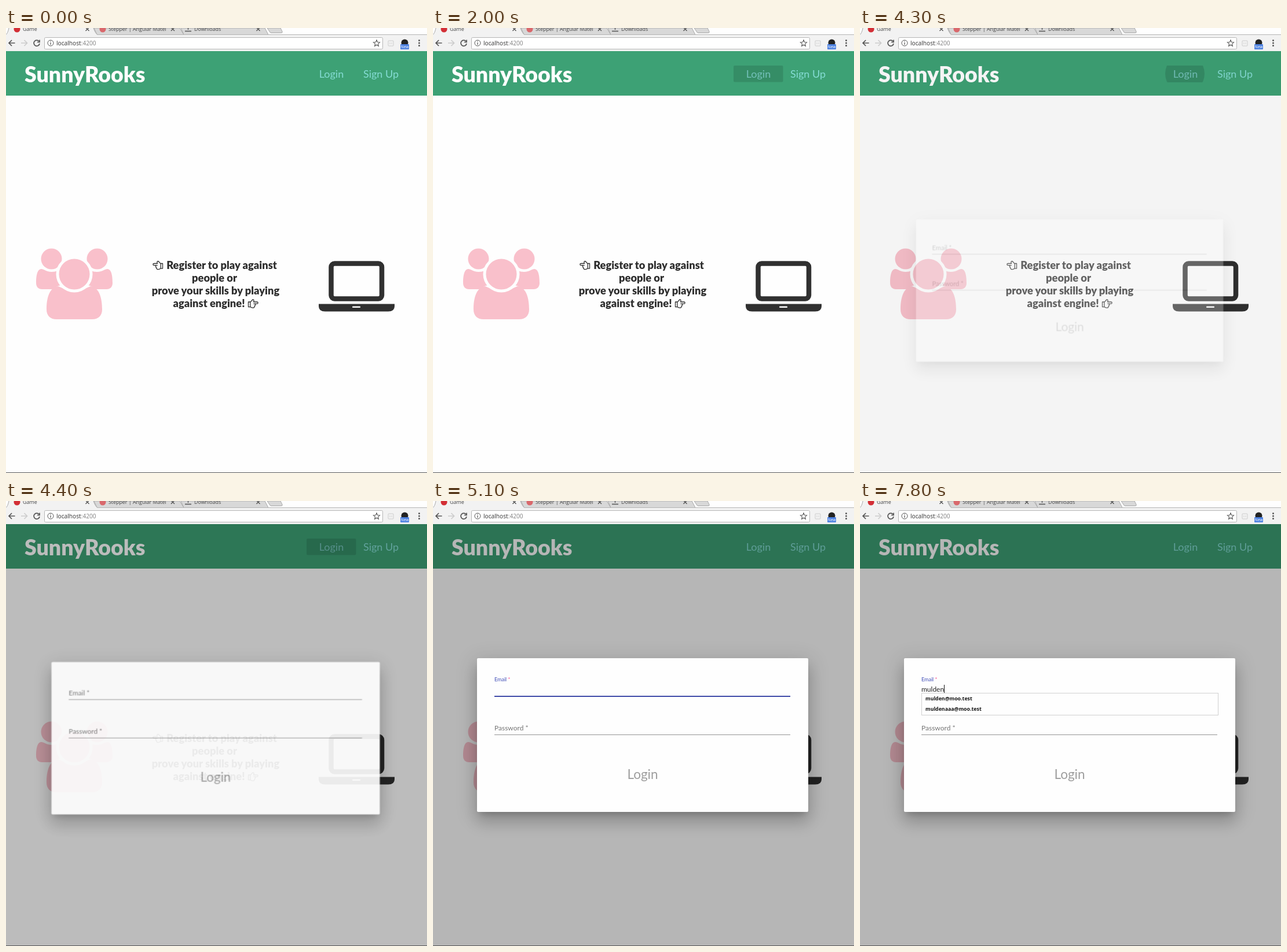
Animation, 727 px wide and 770 px high, one loop 8 s. Source, as an HTML page:

```html
<!DOCTYPE html>
<html lang="en">
<head>
<meta charset="utf-8">
<title>Login dialog</title>
<style>
  html, body { margin: 0; width: 100%; height: 100%; overflow: hidden; background: #fefefe; }
  #stage { position: relative; width: 727px; height: 770px; overflow: hidden; font-family: Lato, sans-serif; }
  #stage > * { position: absolute; }
  svg { display: block; }
  .ui { font-family: "Open Sans", "Noto Sans", sans-serif; }
  .tab { font-size: 8.9px; fill: #444; }
  .mid { text-anchor: middle; }
  .pitch { font-size: 18.3px; font-weight: 900; fill: #2e2e2e; }
  .nav { font-size: 18px; fill: #85dcd4; }
  .line { fill: none; stroke: #555; stroke-width: 1.4; }

  .anim { animation: 8s step-end infinite; }
  #signHover { animation-name: signHover; }
  #loginHover { animation-name: loginHover; }
  #ripple { animation-name: ripple; }
  #shade { left: 0; top: 40px; width: 727px; height: 729px; background: #000; animation-name: shade; }
  #dialog {
    left: 76px; top: 272px; width: 572px; height: 266px;
    background: #fefefe; border-radius: 2px; animation-name: dialog;
    box-shadow: 0 8px 11px -5px rgba(0,0,0,.2), 0 18px 28px 2px rgba(0,0,0,.14), 0 7px 34px 6px rgba(0,0,0,.12);
  }
  .field { font-size: 12px; fill: rgba(0,0,0,.54); }
  #label { animation-name: label; }
  #star { animation-name: star; }
  #focus { transform-box: fill-box; transform-origin: center; fill: #3f4aa8; animation-name: focus; }
  #entry { left: 106px; top: 317px; height: 16px; font-size: 12px; line-height: 17px; color: #222; white-space: pre; }
  #caret { position: absolute; left: 100%; top: 1px; width: 1px; height: 14px; background: #111; animation-name: caret; }
  #list {
    left: 106px; top: 332px; width: 513px; box-sizing: border-box;
    border: 1px solid #d0d0d0; background: #fefefe; color: #111; font-size: 8.8px; font-weight: 700;
  }
  #list div { height: 18.33px; line-height: 18.33px; padding-left: 6px; }
  #floor { left: 0; top: 769px; width: 727px; height: 1px; background: #555; }

  @keyframes signHover { 0%, 2.5% { opacity: 0 } 1.25% { opacity: .12 } }
  @keyframes loginHover { 0%, 51.25% { opacity: 0 } 25% { opacity: .12 } }
  @keyframes ripple {
    0% { r: 0; opacity: 0 }
    51.25% { r: 12px; opacity: .12 }
    52.5% { r: 24px; opacity: .12 }
    53.75% { r: 34px; opacity: .12 }
    55% { r: 46px; opacity: .12 }
    56.25% { r: 46px; opacity: .1 }
    57.5% { r: 46px; opacity: .06 }
    58.75% { r: 46px; opacity: .03 }
    60%, 100% { r: 46px; opacity: 0 }
  }
  @keyframes shade {
    0% { opacity: 0 }
    53.75% { opacity: .039 }
    55% { opacity: .264 }
    56.25% { opacity: .284 }
    57.5%, 100% { opacity: .288 }
  }
  @keyframes dialog {
    0% { opacity: 0; transform: translateY(66px) scale(.9) }
    53.75% { opacity: .27; transform: translateY(49px) scale(.928) }
    55% { opacity: .915; transform: translateY(5.5px) scale(.9913) }
    56.25% { opacity: .985; transform: translateY(1px) scale(.9985) }
    57.5%, 100% { opacity: 1; transform: none }
  }
  @keyframes label {
    0% { transform: translate(106px, 330px) scale(1); fill: rgba(0,0,0,.54) }
    57.5% { transform: translate(106px, 324.5px) scale(.925); fill: #6870a0 }
    58.75% { transform: translate(106px, 315px) scale(.8); fill: #4a58b0 }
    60% { transform: translate(106px, 312px) scale(.76); fill: #4350b8 }
    61.25%, 100% { transform: translate(106px, 311.5px) scale(.75); fill: #4350b8 }
  }
  @keyframes star { 0% { fill: rgba(0,0,0,.54) } 57.5%, 100% { fill: #ff4081 } }
  @keyframes focus {
    0% { opacity: 0; transform: scaleX(.5) }
    57.5% { opacity: .5; transform: scaleX(.7) }
    58.75% { opacity: 1; transform: scaleX(.93) }
    60%, 100% { opacity: 1; transform: none }
  }
  @keyframes caret {
    0%, 63.75%, 76.25% { opacity: 0 }
    62.5%, 70%, 82.5%, 100% { opacity: 1 }
  }
</style>
</head>
<body>
<div id="stage">
  <svg width="727" height="770" viewBox="0 0 727 770">
    <defs>
      <clipPath id="loginBox"><rect x="519" y="65" width="85.500" height="28.500" rx="2"/></clipPath>
      <clipPath id="tabClip"><rect x="170" width="106" height="12"/></clipPath>
      <path id="close" d="M-3-1L3 5M3-1L-3 5" class="line"/>
      <path id="shoulder" d="M61 417c4 0 9 5 18 5 4 0 7-1 10-2-1 13 3 19 8 25-6 0-11 3-14 7H62c-6 0-10-4-10-11 0-9 1-24 9-24z"/>
      <path id="hand" fill="none" stroke="#2e2e2e" stroke-width="1.300" stroke-linejoin="round"
        d="M1 5H4.500C6.500 4.500 7 1 9 1c1.800 0 2 1.800 1 4H16a1.600 1.600 0 0 1 0 3.200H12.500c1 .6.800 2.300-.3 2.600.6 1 0 2.300-1 2.400.2 1.300-.6 2-2 2H8C6 15.200 5.500 13.600 4 13.600H1ZM12.500 8.200H9.800M4.300 5V13.600"/>
    </defs>

    <!-- browser bar -->
    <rect width="727" height="12" fill="#fefefe"/>
    <rect y="11" width="727" height="29" fill="#f2f2f2"/>
    <g fill="#d8d8d8" stroke="#a8a8a8">
      <path d="M451 0l4 6q1 2.500 3 2.500h17q3 0 2-2.500l-3-6z"/>
      <path d="M302 0l5 11.500H453L447 0z"/>
      <path d="M152 0l5 11.500H307L300 0z"/>
    </g>
    <path d="M157 11.500H727" stroke="#b4b4b4"/>
    <path d="M5 0Q3 9 0 12H158Q154 9 151 0z" fill="#f2f2f2"/>
    <path d="M5 0Q3 9 0 11.500M151 0Q154 9 158 11.500" fill="none" stroke="#a8a8a8"/>
    <circle cx="19" cy="2" r="5.500" fill="#d32f36"/>
    <circle cx="167" cy="2" r="5.500" fill="#d9686c"/>
    <path d="M309 5.500H320M314.500 0V3" class="line"/>
    <use href="#close" x="140.500"/><use href="#close" x="288"/><use href="#close" x="435.500"/>
    <g class="ui tab">
      <text x="29" y="5">Game</text>
      <text x="177" y="5" clip-path="url(#tabClip)">Stepper | Angular Material</text>
      <text x="325" y="5">Downloads</text>
    </g>
    <rect x="66.500" y="16.500" width="584" height="20" rx="2" fill="#fff" stroke="#b5b5b5"/>
    <path d="M15.500 26H5.500M10 21L5 26l5 5" class="line" style="stroke-width:1.700"/>
    <path d="M26 26H36M31.500 21l5 5-5 5" class="line" style="stroke:#ccc;stroke-width:1.700"/>
    <path d="M57 23A5 5 0 1 0 58 27M58 20.500V24.500H54" class="line" style="stroke-width:1.700"/>
    <circle cx="77" cy="26" r="5" class="line" style="stroke-width:1"/>
    <path d="M77 25v4M77 22.500v1.300" class="line" style="stroke-width:1.200"/>
    <text class="ui" x="87" y="29.800" font-size="10.200" fill="#333">localhost<tspan fill="#808080">:4200</tspan></text>
    <path d="M640 20.800l1.500 3.700 4 .3-3 2.600.9 3.900-3.400-2.100-3.400 2.100.9-3.900-3-2.600 4-.3z" class="line" style="stroke-width:1.100"/>
    <rect x="660" y="22" width="9" height="9" rx="1" fill="none" stroke="#ccc"/>
    <path d="M663 25v3M666 25v3" stroke="#d4d4d4"/>
    <circle cx="688.500" cy="25.500" r="6" fill="#222"/>
    <rect x="681" y="28" width="15" height="9" rx="1" fill="#4a7fe0"/>
    <text class="ui mid" x="688.500" y="35" font-size="6.500" fill="#fff">New</text>
    <g fill="#555"><circle cx="713.500" cy="21.500" r="1.500"/><circle cx="713.500" cy="26" r="1.500"/><circle cx="713.500" cy="30.500" r="1.500"/></g>

    <!-- page header -->
    <rect y="40" width="727" height="77" fill="#3da175"/>
    <text x="32" y="93.500" font-size="37.500" font-weight="900" fill="#fefefe">SunnyRooks</text>
    <g class="nav mid">
      <text x="562" y="85.500">Login</text>
      <text x="647.500" y="85.500">Sign Up</text>
    </g>
    <rect id="signHover" class="anim" x="605" y="65" width="85" height="28.500" rx="2"/>
    <rect id="loginHover" class="anim" x="519" y="65" width="85.500" height="28.500" rx="2"/>
    <g clip-path="url(#loginBox)"><circle id="ripple" class="anim" cx="561" cy="79" r="0"/></g>

    <!-- people -->
    <g fill="#f9c0cb">
      <circle cx="78.500" cy="399.500" r="18"/>
      <circle cx="157.500" cy="399.500" r="18"/>
      <use href="#shoulder"/>
      <use href="#shoulder" transform="translate(236) scale(-1 1)"/>
      <path d="M90 447c-16 2-20 22-20 40 0 11 7 17 17 17h62c10 0 17-6 17-17 0-18-4-38-20-40-4 0-13 9-28 9s-24-9-28-9z"/>
      <circle cx="118" cy="426" r="29" stroke="#fefefe" stroke-width="5"/>
    </g>

    <g class="pitch mid">
      <text x="372.500" y="417">Register to play against</text>
      <text x="360" y="439">people or</text>
      <text x="362" y="461">prove your skills by playing</text>
      <text x="350.500" y="483">against engine!</text>
    </g>
    <use href="#hand" transform="translate(271.500 402.500) scale(-1 1)"/>
    <use href="#hand" x="417.500" y="469"/>

    <!-- laptop -->
    <rect x="561.500" y="407.500" width="87.500" height="61" rx="6" fill="#fefefe" stroke="#303030" stroke-width="8.500"/>
    <path d="M540 477.500H671V481.500Q671 490.500 660 490.500H551Q540 490.500 540 481.500Z" fill="#303030"/>
    <rect x="598" y="481.500" width="14" height="2.500" rx="1" fill="#fefefe"/>
  </svg>

  <div id="shade" class="anim"></div>

  <div id="dialog" class="anim">
    <svg width="572" height="266" viewBox="76 272 572 266">
      <text id="label" class="field anim">Email <tspan id="star" class="anim">*</tspan></text>
      <rect x="106" y="337" width="511" height="1" fill="#949494"/>
      <rect id="focus" class="anim" x="106" y="337" width="511" height="2"/>
      <text class="field" x="106" y="397">Password *</text>
      <rect x="106" y="404" width="511" height="1" fill="#949494"/>
      <text class="mid" x="362" y="481" font-size="22.500" fill="#9e9e9e">Login</text>
    </svg>
  </div>

  <div id="list" class="ui" hidden></div>
  <div id="entry"><span id="typed"></span><i id="caret" class="anim"></i></div>
  <div id="floor"></div>
</div>

<script>
  const LOOP = 8000, OPEN = 6500, ROWS = 6;
  const word = "mulden";
  const keyTimes = [7100, 7300, 7400, 7500, 7600, 7800];
  const saved = [
    "mulden@moo.test", "howdy@howd.test", "aaaaa", "mulde@moo.test",
    "muldn@moo.test", "dsfsddsf", "muldnaaa@moo.test", "muldenaaa@moo.test"
  ];
  const list = document.getElementById("list");
  const typed = document.getElementById("typed");
  let start, shown;

  function render(t) {
    const count = keyTimes.filter(k => t >= k).length;
    const state = t < OPEN ? -1 : count;
    if (state === shown) return;
    shown = state;
    const prefix = word.slice(0, count);
    typed.textContent = prefix;
    list.hidden = state < 0;
    list.replaceChildren(...saved.filter(s => s.startsWith(prefix)).slice(0, ROWS).map(s => {
      const row = document.createElement("div");
      row.textContent = s;
      return row;
    }));
  }

  function tick(now) {
    start ??= now;
    render((now - start) % LOOP);
    requestAnimationFrame(tick);
  }
  requestAnimationFrame(tick);
</script>
</body>
</html>
```
